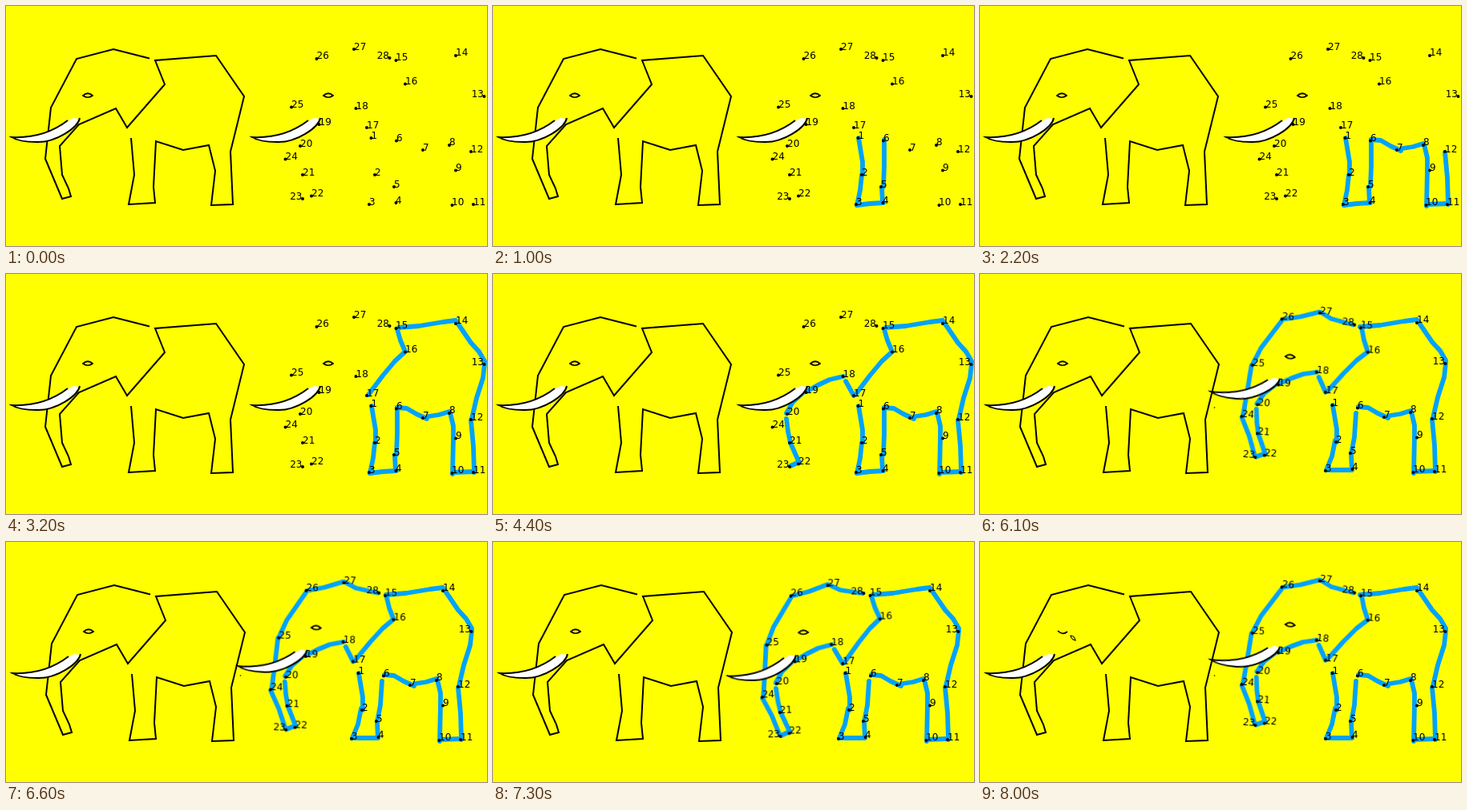
Animation, 600 px wide and 300 px high, one loop 10000 ms. Source, as an HTML page without scripts:

```html
<!DOCTYPE html>
<html lang="en">
<head>
<meta charset="utf-8">
<title>Dot-to-dot elephant</title>
<style>
  @property --step { syntax: "<integer>"; inherits: true; initial-value: 0; }

  html, body { margin: 0; height: 100%; overflow: hidden; background: #ff0; }
  svg { display: block; width: 100%; height: 100%; }

  svg, .left, .body, .foot, .head, .stand, .stride, .open, .wink {
    animation: 10s step-end -5ms infinite;
  }
  svg { animation-name: trace; animation-timing-function: steps(27); }
  .left { animation-name: nudge; }
  .body { animation-name: walk; }
  .foot { animation-name: lift; }
  .head { animation-name: nod; transform-origin: 485px 106px; }
  .stand { animation-name: leave; }
  .stride { animation-name: arrive; }
  .open { animation-name: close; }
  .wink { animation-name: wink; }

  .ink { fill: none; stroke: #000; stroke-width: 2; }
  .eye { stroke-width: 1.7; }
  .trace path {
    fill: none; stroke: #00a2ff; stroke-width: 5.8;
    stroke-linecap: round; stroke-linejoin: round;
    opacity: calc(var(--step) - var(--i));
  }
  .dots { fill: none; stroke: #000; stroke-width: 4; stroke-linecap: round; }
  text { font: 12px "DejaVu Sans", sans-serif; }
  .before { text-anchor: end; }

  @keyframes trace { 0% { --step: 0; } 54%, 100% { --step: 27; } }
  @keyframes nudge { 0% { transform: none; } 59%, 100% { transform: translate(1px, 0); } }
  @keyframes walk { 0% { transform: none; } 59%, 100% { transform: translate(-16px, -1px); } }
  @keyframes lift { 0% { transform: none; } 59%, 100% { transform: translate(-6px, -1px); } }
  @keyframes nod {
    0% { transform: translate(0, 0) rotate(0deg); }
    59%, 66% { transform: translate(-15px, -1px) rotate(2.5deg); }
    61% { transform: translate(-15px, -1px) rotate(5.1deg); }
    68% { transform: translate(-15px, -1px) rotate(0deg); }
    73% { transform: translate(-15px, -1px) rotate(-1.5deg); }
    75%, 100% { transform: translate(-15px, -1px) rotate(5.1deg); }
  }
  @keyframes leave { 0% { visibility: visible; } 59%, 100% { visibility: hidden; } }
  @keyframes arrive { 0% { visibility: hidden; } 59%, 100% { visibility: visible; } }
  @keyframes close { 0% { visibility: visible; } 80%, 100% { visibility: hidden; } }
  @keyframes wink { 0% { visibility: hidden; } 80%, 100% { visibility: visible; } }
</style>
</head>
<body>
<svg viewBox="0 0 600 300">
  <defs>
    <g id="tusk">
      <path fill="#fff" d="M7 164C30 165 55 160 77 144L84 140L92 141C90 152 62 171 38 170C25 170 15 169 7 164Z"/>
      <path class="ink" d="M77 143C55 160 30 165 7 164C15 169 25 170 38 170C62 171 90 152 92 140"/>
    </g>
    <path id="eye" class="ink eye" d="M96 112Q102 106.500 108 112Q102 116.500 96 112Z"/>
  </defs>

  <g class="left">
    <polyline class="ink" points="156,165 160,211 153,248 186,246 184,226 187,169 221,180 253,174 261,206 256,249 283,248 280,182 297,113 262,62 186,68 198,98 151,152 137,128 91,148 67,175 70,211 78,228 81,238 70,241 49,191 56,127 88,66 134,54 179,65.500"/>
    <use href="#tusk"/>
    <use href="#eye" class="open"/>
    <g class="wink">
      <path class="ink eye" d="M96 111Q102 117 108 112"/>
      <path class="ink" stroke-width="1" style="stroke-width:1.200" d="M112 117Q117 117 118 123Q113 122 112 117Z"/>
    </g>
  </g>

  <circle class="stride" cx="292.500" cy="167" r=".8"/>

  <g class="body">
    <g class="trace">
      <path style="--i:0" d="M456 165L461 195L461 211"/>
      <g class="stand">
        <path style="--i:1" d="M460 211L458 230L454 249"/>
        <path style="--i:2" d="M454 249L470 247L487 246"/>
        <path style="--i:3" d="M486 246L485 227"/>
        <path style="--i:4" d="M487 226L488 200L488 167"/>
      </g>
      <path class="stride" style="--i:1" d="M459 209L455 229L448 246L480 246L479 226L483 205L485 175"/>
      <path style="--i:5" d="M488 167L500 168L512 175L525 181"/>
      <path style="--i:6" d="M527 178L540 176L553 172"/>
      <path style="--i:7" d="M554 173L558 190L558 205"/>
      <path style="--i:8" d="M558 205L557 250"/>
      <path style="--i:9" d="M558 248L584 247"/>
      <path style="--i:10" d="M584 248L583 215L580 183"/>
      <path style="--i:11" d="M581 181L587 155L595 130L597 112"/>
      <path style="--i:12" d="M597 109L590 97L580 86L563 61"/>
      <path style="--i:13" d="M561 58L545 60L515 65L490 67"/>
    </g>
    <path class="dots" d="M455.500 165h0M460 211h0M487 168.500h0M520 180h0M553 174h0M561 205.500h0M556.500 249h0M583 248h0M580 182h0M596.500 113h0M561 62h0"/>
    <text x="455.500" y="166">1</text>
    <text x="460" y="212">2</text>
    <text x="487" y="169">6</text>
    <text x="520" y="181">7</text>
    <text x="553" y="174">8</text>
    <text x="561" y="206">9</text>
    <text x="556" y="249">10</text>
    <text x="583" y="249">11</text>
    <text x="580" y="183">12</text>
    <text class="before" x="596" y="114">13</text>
    <text x="561" y="62">14</text>
    <g class="foot">
      <path class="dots" d="M453 248h0M486.500 246h0M484 226h0"/>
      <text x="453" y="249">3</text>
      <text x="486" y="247">4</text>
      <text x="484" y="227">5</text>
    </g>
  </g>

  <g class="head">
    <g class="trace">
      <path style="--i:14" d="M488 69L492 83L498 97"/>
      <path style="--i:15" d="M497 98L485 109L470 127L452 151"/>
      <path style="--i:16" d="M450 152L440 134"/>
      <path style="--i:17" d="M437 128L420 132L405 139L391 147"/>
      <path style="--i:18" d="M387 148L374 160L366 174"/>
      <path style="--i:19" d="M366 181L368 197L371 211"/>
      <path style="--i:20" d="M371 211L382 236"/>
      <path style="--i:21" d="M382 235L371 240"/>
      <path style="--i:22" d="M369 239L360 215L349 193"/>
      <path style="--i:23" d="M350 191L353 155L355 127"/>
      <path style="--i:24" d="M356 126L365 104L387 69"/>
      <path style="--i:25" d="M389 66L410 61L433 53"/>
      <path style="--i:26" d="M435 53L449 60L477 65"/>
    </g>
    <use href="#tusk" x="300"/>
    <use href="#eye" x="300"/>
    <path class="dots" d="M486.500 68h0M498 97.500h0M450 152h0M436.500 128h0M390.500 148h0M367 175h0M370 211h0M381 237.500h0M370 241h0M348.500 191.500h0M356 126.500h0M387.500 66h0M434 54h0M478.500 65h0"/>
    <text x="486" y="68">15</text>
    <text x="498" y="98">16</text>
    <text x="450" y="153">17</text>
    <text x="436.500" y="129">18</text>
    <text x="390.500" y="149">19</text>
    <text x="367" y="176">20</text>
    <text x="370" y="212">21</text>
    <text x="381" y="238">22</text>
    <text class="before" x="369.500" y="242">23</text>
    <text x="348.500" y="192">24</text>
    <text x="356" y="127">25</text>
    <text x="387.500" y="66">26</text>
    <text x="434" y="54.500">27</text>
    <text class="before" x="478" y="66">28</text>
  </g>
</svg>
</body>
</html>
```
